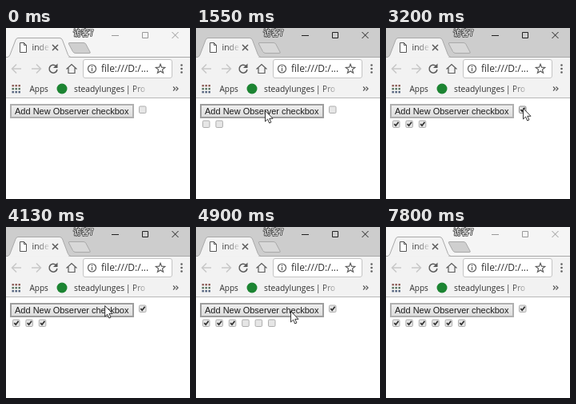
These frames come from a looping animation (230 px wide and 214 px high, 7870 ms). An HTML page:

```html
<!DOCTYPE html>
<html lang="en">
<head>
<meta charset="utf-8">
<title>Observer checkboxes</title>
<style>
  html, body { margin: 0; width: 100%; height: 100%; overflow: hidden; background: #fff; }
  svg { display: block; width: 100vw; height: 100vh; }
  text { white-space: pre; }
  .ui { font-family: "Open Sans", "Noto Sans", sans-serif; fill: #303030; }
  .line { fill: none; stroke: #5a5a5a; stroke-width: 1.5; }
  .thin { stroke-width: 1.2; }
  .faint { stroke: #c8c8c8; }
  .edge { fill: none; stroke: #a9a9a9; }
  .profile { font: 10px "Noto Sans CJK SC", "Noto Sans CJK", sans-serif;
    fill: #fff; stroke: #484848; stroke-width: 1.7; paint-order: stroke; stroke-linejoin: round; }
  .label { font: 11px "Liberation Sans", Arial, sans-serif; fill: #1c1c1c; }
</style>
</head>
<body>
<svg viewBox="0 0 230 214">
  <defs>
    <linearGradient id="fadeTab" gradientUnits="userSpaceOnUse" x1="38" x2="54">
      <stop stop-color="#333"/><stop offset="1" stop-color="#333" stop-opacity=".1"/>
    </linearGradient>
    <linearGradient id="fadeMark" gradientUnits="userSpaceOnUse" x1="158" x2="177">
      <stop stop-color="#333"/><stop offset="1" stop-color="#333" stop-opacity=".15"/>
    </linearGradient>
    <linearGradient id="face" x2="0" y2="1">
      <stop stop-color="#f0f0f0"/><stop offset="1" stop-color="#dcdcdc"/>
    </linearGradient>
    <linearGradient id="faceDown" x2="0" y2="1">
      <stop stop-color="#d4d4d4"/><stop offset="1" stop-color="#e6e6e6"/>
    </linearGradient>
  </defs>

  <!-- Title bar and tab -->
  <rect id="titleBar" width="230" height="36"/>
  <path id="newTab" stroke="#a9a9a9" d="M79 18.5H97Q99 18.5 100 20.5L105 30Q106 31.5 104 31.5H87Q84.5 31.5 83.5 29.5L78.500 20Q78 18.5 79 18.5Z"/>
  <rect y="36" width="230" height="52" fill="#f2f2f2"/>
  <path class="edge" d="M78 36.500H230"/>
  <path class="edge" style="fill:#f2f2f2" d="M0 36.5H2Q4 36 5 33.500L12 15Q13 12.5 15 12.5H67Q69.5 12.5 70.5 15L77.5 33.5Q78.5 36 81 36.5"/>
  <path d="M17.5 18.5H22.5L25.5 21.5V30.5H17.5ZM22.5 18.5V21.5H25.5" fill="#fff" stroke="#555"/>
  <text class="ui" x="32.5" y="28" font-size="10.5" style="fill:url(#fadeTab)">inde</text>
  <path class="line" d="M58 21L65 28M65 21L58 28"/>
  <text class="profile" x="84" y="10">访客7</text>
  <path id="controls" fill="none" d="M132 9.5H141M170.5 5.5H177.5V12.5H170.5ZM207.5 5L215.5 13M215.5 5L207.5 13"/>

  <!-- Toolbar -->
  <path class="line faint" d="M19 51H8M13 45.5L7.5 51L13 56.5M32 51H43M38 45.5L43.5 51L38 56.5"/>
  <path class="line" d="M62.5 47.5A5 5 0 1 0 64 52"/>
  <path d="M64.5 44.5V50H59Z" fill="#5a5a5a"/>
  <path class="line thin" d="M75.5 51.5L82 45.5L88.5 51.5M78 50V56.5H86V50"/>
  <rect x="96.5" y="39.5" width="111" height="23" rx="2.5" fill="#fff" stroke="#c4c4c4"/>
  <circle class="line thin" cx="107.5" cy="51" r="5"/>
  <path class="line thin" d="M107.5 47.5V49M107.5 50V54"/>
  <text class="ui" x="119" y="55" font-size="12">file:///D:/...</text>
  <path id="star" class="line thin"/>
  <path d="M219.5 46.500V56" stroke="#5a5a5a" stroke-width="2.6" stroke-linecap="round" stroke-dasharray="0 4.500"/>

  <!-- Bookmarks -->
  <g id="grid"></g>
  <text class="ui" x="29.5" y="80" font-size="10">Apps</text>
  <circle cx="70" cy="76" r="6.5" fill="#1c8432"/>
  <text class="ui" x="85" y="80" font-size="10.3">steadylunges</text>
  <text class="ui" x="150" y="80" font-size="10" style="fill:url(#fadeMark)">| Pro</text>
  <path class="line thin" d="M209 73.5L211.5 76L209 78.5M212.5 73.5L215 76L212.5 78.5"/>
  <path d="M0 87.500H230" stroke="#b9b9b9"/>

  <!-- Page -->
  <rect id="button" x="6" y="96" width="153" height="16" stroke-width="2"/>
  <text class="label" x="11" y="108">Add New Observer checkbox</text>
  <g id="boxes"></g>
  <path id="cursor" d="M.5 .5V14L3.6 11.1L5.7 16L7.9 15L5.8 10.3H10Z" fill="#fff" stroke="#222" stroke-width=".9"/>
</svg>
<script>
const LOOP = 7870, TICK = 78, HOLD = 80;
const $ = id => document.getElementById(id);

function set(node, attrs) {
  for (const key in attrs) node.setAttribute(key, attrs[key]);
  return node;
}
function add(parent, tag, attrs) {
  return parent.appendChild(set(document.createElementNS("http://www.w3.org/2000/svg", tag), attrs));
}
const show = (node, on) => set(node, { visibility: on ? "visible" : "hidden" });

const easeOut = p => 1 - (1 - p) ** 3;
const easeIn = p => p ** 1.5;

// The pointer glides from spot to spot, redrawn once per tick
const entry = { x: 203, y: 220 };
const moves = [
  { from: 140, to: 620, x: 86, y: 103, ease: easeOut },
  { from: 2020, to: 2270, x: 191, y: 100, ease: easeOut },
  { from: 2420, to: 2740, x: 171, y: 100, ease: easeOut },
  { from: 3820, to: 4290, x: 122, y: 98, ease: easeOut },
  { from: 4440, to: 4900, x: 118, y: 105, ease: easeOut },
  { from: 4980, to: 5690, x: 172, y: 101, ease: easeOut },
  { from: 6860, to: 7320, x: 203, y: 220, ease: easeIn }
];
const additions = [1340, 1550, 1790, 4290, 4590, 4900];
const toggles = [2880, 5840, 6310];
const focus = additions[0] - HOLD - 10, blur = 7800;

function pointer(t) {
  let { x, y } = entry;
  for (const move of moves) {
    if (t < move.from) break;
    const steps = Math.round((move.to - move.from) / TICK) + 1;
    const step = Math.floor((t - move.from) / TICK + .1) + 1;
    const p = move.ease(Math.min(1, step / steps));
    x += (move.x - x) * p;
    y += (move.y - y) * p;
  }
  return { x, y };
}

const star = Array.from({ length: 10 }, (_, i) => {
  const r = i % 2 ? 2.6 : 6, a = i * Math.PI / 5;
  return `${193 + r * Math.sin(a)} ${51.3 - r * Math.cos(a)}`;
});
set($("star"), { d: `M${star.join("L")}Z` });

const dotColors = ["#8a5a55", "#55705c", "#4f5f7a"];
for (let i = 0; i < 9; i++) {
  const col = i % 3, row = Math.floor(i / 3);
  add($("grid"), "rect", { x: 7.5 + col * 4, y: 71 + row * 4, width: 2.4, height: 2.4, fill: dotColors[row] });
}

function makeBox(x, y, born) {
  const group = add($("boxes"), "g", { transform: `translate(${x} ${y})` });
  const frame = add(group, "rect", { x: .5, y: .5, width: 8.5, height: 8.5, rx: 1.3, fill: "#e6e6e6" });
  const tick = add(group, "path", { d: "M2.3 4.7L4.2 6.7L7.6 2.3", fill: "none", stroke: "#333", "stroke-width": 1.8 });
  return { group, frame, tick, born };
}
const boxes = [makeBox(166, 97.5, 0), ...additions.map((born, i) => makeBox(8 + i * 16.4, 115.5, born))];

function draw(t) {
  const active = t >= focus && t < blur;
  set($("titleBar"), { fill: active ? "#cdcdcd" : "#f5f5f5" });
  set($("newTab"), { fill: active ? "#d8d8d8" : "#cfcfcf" });
  set($("controls"), { stroke: active ? "#222" : "#999" });

  const { x, y } = pointer(t);
  set($("cursor"), { transform: `translate(${x} ${y})` });
  const over = (left, top, w, h) => x >= left && x < left + w && y >= top && y < top + h;

  const down = additions.some(up => t >= up - HOLD && t < up);
  set($("button"), {
    fill: down ? "url(#faceDown)" : "url(#face)",
    stroke: over(5, 95, 155, 18) ? "#9e9e9e" : "#b0b0b0"
  });

  // Toggles alternate between checking and clearing every box present
  const done = toggles.filter(at => at <= t);
  const checkedAt = done.length % 2 ? done[done.length - 1] : 0;
  boxes.forEach(({ group, frame, tick, born }, i) => {
    show(group, t >= born);
    show(tick, born < checkedAt);
    set(frame, { stroke: !i && over(166, 97, 10, 10) ? "#888" : "#adadad" });
  });
}

function loop() {
  draw(performance.now() % LOOP);
  requestAnimationFrame(loop);
}
loop();
</script>
</body>
</html>
```
